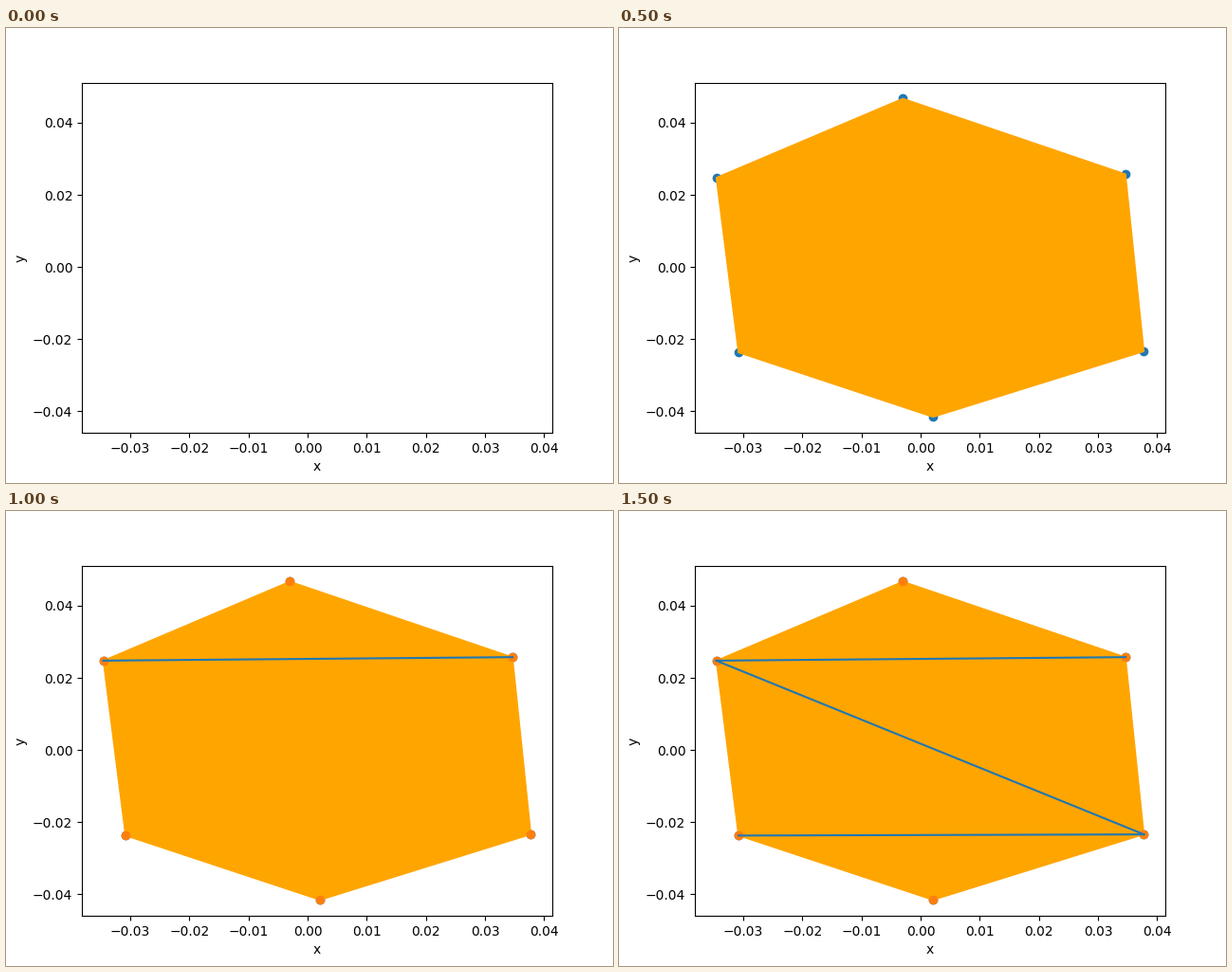
Recreate the animation shown at these times as a matplotlib script. Size 640 by 480 pixels, loop 1.75 s.

```python
import matplotlib.pyplot as plt
import numpy as np
from matplotlib.animation import FuncAnimation

STEP_MS = 250

# Hexagon corners, counter-clockwise from the right
corners = np.array([
    (0.03464, 0.02575),
    (-0.0030, 0.04671),
    (-0.03455, 0.02478),
    (-0.0308, -0.0237),
    (0.0021, -0.04157),
    (0.03775, -0.02338),
])
x, y = corners.T

fig, ax = plt.subplots(figsize=(6.4, 4.8), dpi=100)
ax.set_xlabel("x")
ax.set_ylabel("y")

# Parts in the order they appear; each stays once shown
parts = [
    ax.scatter(x, y, color="C0"),
    *ax.fill(x, y, color="orange"),
    ax.scatter(x, y, color="C1"),
]

# Triangulate by zigzagging between the two sides
zigzag = corners[[0, 2, -1, 3]]
for start, end in zip(zigzag, zigzag[1:]):
    parts += ax.plot(*zip(start, end), color="C0")


def update(step):
    for i, part in enumerate(parts):
        part.set_visible(i < step)
    return parts


anim = FuncAnimation(fig, update, frames=len(parts) + 1, interval=STEP_MS,
                     repeat=True, repeat_delay=0)
plt.show()
```
